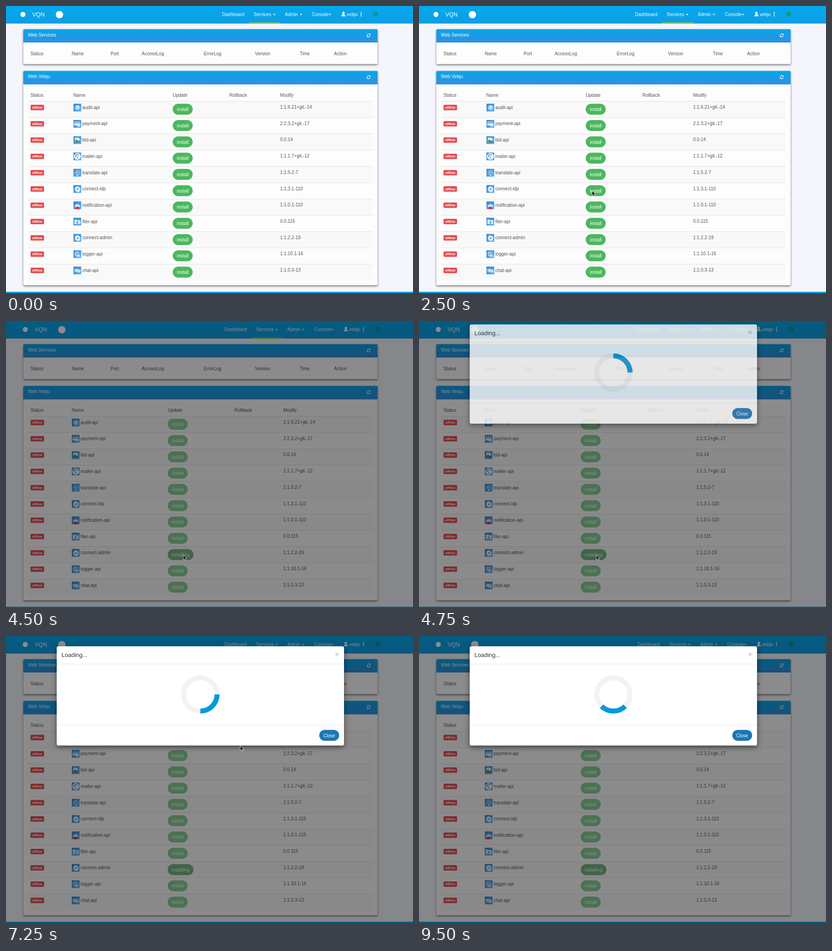
An HTML page for the animation above (9.75 s loop, 891x629 px).

```html
<!DOCTYPE html>
<html lang="en">
<head>
<meta charset="utf-8">
<title>Services</title>
<style>
html, body { margin: 0; width: 100%; height: 100%; overflow: hidden; background: #f4f6fb; }
svg { display: block; width: 891px; height: 629px; }
text { font: 10.03px "Liberation Sans", Arial, Helvetica, sans-serif; white-space: pre; }
.panel { filter: drop-shadow(0 2px 2px rgba(0,0,0,.55)); }
.modal { filter: drop-shadow(0 4px 6px rgba(0,0,0,.5)); }
</style>
</head>
<body>
<svg id="stage" viewBox="0 0 891 629">
  <defs>
    <linearGradient id="nav" x2="0" y2="1"><stop stop-color="#03a8ee"/><stop offset="1" stop-color="#109ee4"/></linearGradient>
    <linearGradient id="head" x2="0" y2="1"><stop stop-color="#06a6e9"/><stop offset="1" stop-color="#2f90df"/></linearGradient>
    <linearGradient id="tile" x2="1" y2="1"><stop stop-color="#2f86d2"/><stop offset="1" stop-color="#62b1ee"/></linearGradient>
  </defs>
  <g id="scene"></g>
</svg>
<script>
const STEP = 250, LOOP = 9750, OPEN = 18, TARGET = 8;
const INK = '#555', WHITE = '#fff';

const disc = '<circle cx="9" cy="9" r="6" fill="#d3eafc"/><path d="M9 9L4 5A6 6 0 0 1 9 3ZM9 9l5 4a6 6 0 0 1-5 2Z" fill="#fff"/><circle cx="9" cy="9" r="1.8" fill="#4c9fe0"/>';
const line = (d, color = WHITE, w = 1) => `<path d="${d}" fill="none" stroke="${color}" stroke-width="${w}"/>`;
const rows = [
  ['audit-api', '1:1.6.21+git.-14', '<circle cx="8.5" cy="8.5" r="5.5" fill="#a9d4f6"/>' + line('M8 9.5L12.5 5', WHITE, 1.6)],
  ['payment-api', '2:2.3.2+git.-17', '<rect x="1.5" y="4" width="13" height="8" rx="1" fill="#d8edfc"/>' + line('M1.5 6.5h13', '#3a8fd6', 1.6) + '<circle cx="11.5" cy="11" r="3.4" fill="#fff"/>' + line('M9.8 11l1.3 1.3 2.2-2.5', '#3a8fd6')],
  ['bid-api', '0.0.14', '<path d="M3 3h8l3 3v8H3Z" fill="#dbe9f8"/><path d="M3 14V10l4-3 7 7Z" fill="#4b9b46"/><path d="M7 14l7-6v6Z" fill="#3b7fc4"/>'],
  ['mailer-api', '1:1.1.7+git.-12', '<circle cx="8.5" cy="8.5" r="7.3" fill="#fff"/>' + line('M5 10.5a4 4 0 0 1 7-4M8.5 8v5.5M6 4l-2 3.5', '#3a8fd6', 1.7)],
  ['translate-api', '1:1.5.2-7', '<circle cx="8.5" cy="8" r="5.8" fill="#a4d1f5"/>' + line('M3 6h11M3 10h11M8.5 2v12M6 3q-2 5 0 10M11 3q2 5 0 10', '#3a8fd6', .8) + '<path d="M7 13h3l-1.5 3Z" fill="#fff"/>'],
  ['connect-idp', '1:1.3.1-110', disc],
  ['notification-api', '1:1.0.1-110', '<path d="M2.5 12a6 6 0 0 1 12 0Z" fill="#d3eafc"/><path d="M4 17a4.6 4.6 0 1 1 9 0Z" fill="#ee2b3c"/>'],
  ['filer-api', '0.0.115', '<path d="M2 4h5l1 1.5h7V14H2Z" fill="#d3eafc"/>' + line('M8.5 7v5M6.5 10l2 2.2 2-2.2', '#3a8fd6', 1.2)],
  ['connect-admin', '1:1.2.2-19', disc],
  ['logger-api', '1:1.10.1-16', '<circle cx="7.5" cy="7.5" r="5.5" fill="#b5daf7"/>' + line('M2 6h11M2 9h11M7.5 2v11', '#3a8fd6', .8) + line('M7 11h8M7 13.5h8', WHITE, 1.3)],
  ['chat-api', '1:1.0.3-13', '<path d="M2 5h9v6H6l-2 2v-2H2Z" fill="#a9d4f6"/><path d="M6 7h9v5h-2l-2 2.5-1-2.5H6Z" fill="#e5f3fd"/>' + line('M7.5 9.5h6', '#4c9fe0')]
];

// Pointer waypoints: step, x, y
const path = [[3, 170, 120], [4, 286, 175], [5, 318, 195], [6, 373, 339], [8, 376, 372], [10, 379, 405], [11, 379, 405],
  [13, 384, 452], [15, 389, 514], [16, 388, 513], [19, 388, 513], [20, 420, 440], [22, 513, 241], [30, 513, 241],
  [32, 668, 228], [34, 735, 45], [35, 740, 3]];

const text = (x, y, s, color = INK, style = '') => `<text x="${x}" y="${y}" fill="${color}" style="${style}">${s}</text>`;
const rect = (x, y, w, h, fill, rx = 0) => `<rect x="${x}" y="${y}" width="${w}" height="${h}" rx="${rx}" fill="${fill}"/>`;
const move = (x, y, s, attr = '') => `<g transform="translate(${x} ${y})" ${attr}>${s}</g>`;
const caret = x => `<path d="M${x} 17.5h5.4l-2.7 2.9Z" fill="#fff"/>`;

function navbar(shift) {
  const items = [['Dashboard', 473], ['Services', 542.3], ['Admin', 610.5], ['Console', 669.5]];
  return rect(0, 0, 891, 38.5, 'url(#nav)') + move(shift, 0,
    '<circle cx="37" cy="18.5" r="5.5" fill="#fff"/><circle cx="117" cy="19" r="8" fill="#fff"/>' +
    text(57.5, 22.5, 'VQN', WHITE, 'font-size:12.5px') +
    items.map(([s, x]) => text(x, 22, s, WHITE)).join('') +
    [584.5, 643, 706.8].map(caret).join('') +
    rect(532, 36, 68, 2.6, '#8bc540') +
    '<ellipse cx="738.7" cy="15.8" rx="2.6" ry="3.2" fill="#fff"/><path d="M733.8 22.5q0-2.5 3.5-3.5h3q3.5 1 3.5 3.5Z" fill="#fff"/>' +
    text(746, 22, 'velqu', WHITE, 'font-style:italic') +
    [14.5, 18, 21.5].map(y => `<circle cx="777.5" cy="${y}" r="1.2" fill="#fff"/>`).join('') +
    '<circle cx="809" cy="17.7" r="4.2" fill="none" stroke="#0b8a2c" stroke-width="1.3"/>' +
    line('M806.8 17.6l1.7 1.8 3-3.4', '#0b8a2c', 1.3));
}

function panel(y, h, title) {
  const refresh = line('M-3.4-.5A3.4 3.4 0 0 1 2.6-2.2M3.4.5A3.4 3.4 0 0 1-2.6 2.2', WHITE, 1.2) +
    '<path d="M4-4v3.2H.8ZM-4 4V.8H-.8Z" fill="#fff"/>';
  return `<g class="panel">${rect(38, y, 775.5, h, '#fdfdfe', 2)}</g>` +
    rect(38, y, 775.5, 29.3, 'url(#head)', 2) + rect(38, y + 26, 775.5, 3.3, '#2f90df') +
    text(48, y + 15.8, title, WHITE) + move(794, y + 13.6, refresh);
}

function button(x, y, label, w, fill, faded) {
  return `<g opacity="${faded ? .65 : 1}">${rect(x, y - 12, w, 24, fill, 12)}` +
    text(x + w / 2, y + 3.8, label, WHITE, 'text-anchor:middle') + '</g>';
}

function table(busy, pressed) {
  const [name, update, rollback, modify] = busy ? [143.7, 354, 500, 607] : [147.3, 365, 489, 600];
  const heads = [['Status', 53.5], ['Name', name], ['Update', update], ['Rollback', rollback], ['Modify', modify]];
  return heads.map(([s, x]) => text(x, 199.3, s)).join('') + rows.map(([label, version, icon], i) => {
    const y = 208.4 + 35.7 * i, hit = i === TARGET;
    return rect(48, y, 755, 35.7, i % 2 ? '#fdfdfe' : '#f9f9f9') + rect(48, y, 755, .8, '#dcdcdc') +
      rect(53.7, y + 8.2, 29.6, 11.8, '#e24c4f', 2) +
      text(68.5, y + 16.6, 'offline', WHITE, 'font-size:7.5px;font-weight:bold;text-anchor:middle') +
      move(name + .4, y + 5.7, rect(0, 0, 17, 17, 'url(#tile)') + icon) +
      text(name + 19.6, y + 17.3, label) + text(modify, y + 16.6, version) +
      button(update, y + 17.9, busy && hit ? 'installing' : 'install', busy && hit ? 56.3 : 43.7,
        pressed && hit ? '#2f9144' : '#4cb75f', busy);
  }).join('');
}

function modal(k) {
  const ring = '<circle r="36.5" fill="none" stroke-width="11" ';
  return `<g class="modal">${rect(111, 22.5, 629, 217.5, WHITE, 4)}</g>` +
    text(121.5, 46, 'Loading...', '#333', 'font-size:12.9px') +
    text(724.7, 45, '×', '#c4c4c4', 'font-size:15px;font-weight:bold;text-anchor:middle') +
    rect(111, 61, 629, .8, '#e3e3e3') + rect(111, 194.5, 629, .8, '#e3e3e3') +
    move(425.5, 128, ring + 'stroke="#f3f3f3"/>' +
      ring + `stroke="#0799dc" pathLength="4" stroke-dasharray="1 3" transform="rotate(${(k - OPEN) * 45 - 135})"/>`) +
    button(685.8, 217.8, 'Close', 43.5, '#1c77b6');
}

function pointer(k) {
  const i = path.findIndex(p => p[0] >= k);
  if (i < 0 || k < path[0][0]) return '';
  const b = path[i], a = path[i - 1] || b, f = (k - a[0]) / (b[0] - a[0] || 1);
  return move(a[1] + (b[1] - a[1]) * f, a[2] + (b[2] - a[2]) * f,
    '<path d="M0 0V10.5L2.4 8.3 4.1 12.2 5.9 11.4 4.2 7.6H7.5Z" stroke="#fff" stroke-width=".8"/>');
}

function draw(k) {
  const busy = k >= OPEN;
  const heads = [['Status', 53.5], ['Name', 143.7], ['Port', 229], ['AccessLog', 297], ['ErrorLog', 432.7],
    ['Version', 545], ['Time', 643.3], ['Action', 718]];
  let s = rect(0, 0, 891, 629, '#f4f6fb') + navbar(busy ? 5.2 : 0) +
    panel(50.7, 76.5, 'Web Services') + heads.map(([t, x]) => text(x, 107.5, t)).join('') +
    panel(142.3, 469.7, 'Web Velqu') + table(busy, k >= 15) + rect(0, 626.3, 891, 3, '#06a5e9');
  if (busy) s += '<rect width="891" height="629" opacity=".45"/>';
  if (k > OPEN) s += move(0, k === OPEN + 1 ? -15 : 0, modal(k), k === OPEN + 1 ? 'opacity=".8"' : '');
  scene.innerHTML = s + pointer(k);
}

const scene = document.getElementById('scene'), start = performance.now();
let last = -1;
function tick() {
  const k = Math.floor((performance.now() - start) % LOOP / STEP);
  if (k !== last) draw(last = k);
  requestAnimationFrame(tick);
}
tick();
</script>
</body>
</html>
```
